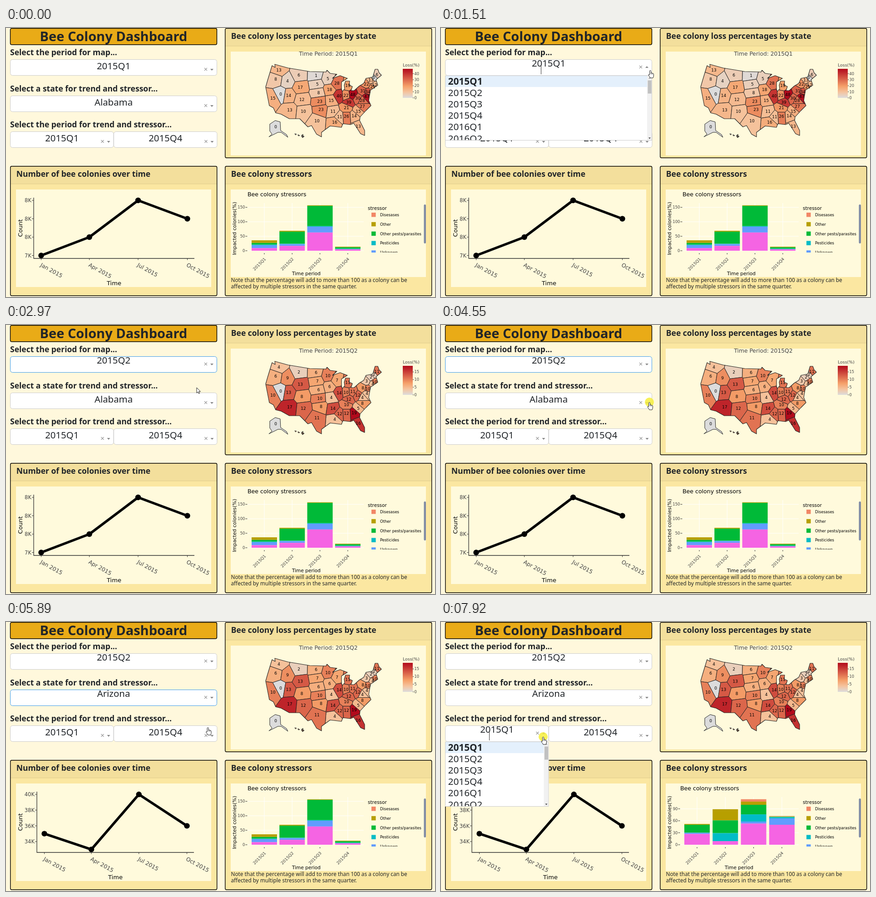
Animation of 945x593 px, one loop 7.99 s. Source, as an HTML page:

```html
<!DOCTYPE html>
<html lang="en">
<head>
<meta charset="utf-8">
<title>Bee Colony Dashboard</title>
<style>
  html, body { margin: 0; width: 100%; height: 100%; overflow: hidden; background: #fff8dc; }
  #stage { display: block; width: 100vw; height: 100vh; }
  text { font-family: "DejaVu Sans", sans-serif; fill: #444; }
  .ui { font: 20.4px "Noto Sans", sans-serif; fill: #212529; }
  .bold { font-weight: 700; }
  .title { font-size: 29px; }
  .head { font-size: 17.5px; }
  .row { font-size: 20.8px; }
  .note { font-size: 11.8px; }
  .mid { text-anchor: middle; }
  .end { text-anchor: end; }
  .ink { fill: #000; }
</style>
</head>
<body>
<svg id="stage" viewBox="0 0 945 593" preserveAspectRatio="none"></svg>
<script>
const LOOP = 7990;

const rect = (x, y, w, h, fill, more = '') =>
  `<rect x="${x}" y="${y}" width="${w}" height="${h}" fill="${fill}" ${more}/>`;
const text = (x, y, s, size, cls = '', more = '') =>
  `<text x="${x}" y="${y}" class="${cls}" ${size ? `font-size="${size}"` : ''} ${more}>${s}</text>`;
const path = (d, stroke, width = 1, fill = 'none') =>
  `<path d="${d}" stroke="${stroke}" stroke-width="${width}" fill="${fill}" stroke-linejoin="round"/>`;
const turned = (x, y, angle, s, size, cls) =>
  text(0, 0, s, size, cls, `transform="translate(${x} ${y}) rotate(${angle})"`);
const during = (from, to, content) => `<g data-from="${from}" data-to="${to}">${content}</g>`;
const times = (spans, content) => spans.map(([from, to]) => during(from, to, content)).join('');
const range = n => [...Array(n).keys()];

// Page furniture
const card = (x, y, title) =>
  rect(x, y, 455, 285.5, '#fbe7a1', 'rx="3"') +
  rect(x, y, 455, 39, '#f3df9c') + path(`M${x} ${y + 39}h455`, '#dfcc8c') +
  rect(x, y, 455, 285.5, 'none', 'rx="3" stroke="#000" stroke-width="1.4"') +
  text(x + 13, y + 23.5, title, 0, 'ui bold head');

const plotBox = (x, y, h) => rect(x, y, 430, h, '#fffadc');

function select(x, y, w, value, { raised = false, open = false, focus = false } = {}) {
  const high = raised || open, right = x + w, mid = y + (high ? 17 : 22);
  const arrow = open ? `M${right - 15} ${mid + 2}h7l-3.5 -4z` : `M${right - 15} ${mid - 1}h7l-3.5 4z`;
  return rect(x + .5, y + .5, w - 1, 35, '#fff', `rx="5" stroke="${focus ? '#3d9be9' : '#ccc'}"`) +
    text(x + w / 2, y + (high ? 16.3 : 21.7), value, 0, 'ui mid') +
    path(`M${right - 28} ${mid - 3}l6 6m0 -6l-6 6`, '#999', 1.1) + path(arrow, 'none', 0, '#888');
}

function dropdown(x, y, w, items, hovers) {
  const rowY = i => .5 + 25.1 * i, bar = w - 11;
  const rows = hovers.map(([from, to, i]) => during(from, to, rect(0, rowY(i), bar, 25.1, '#e4f0fc'))).join('') +
    items.map((s, i) => text(6.5, rowY(i) + 20, s, 0, i ? 'ui row' : 'ui row bold')).join('');
  return `<svg x="${x}" y="${y}" width="${w}" height="143.5">` +
    rect(0, 0, w, 143.5, '#fff') + rows +
    rect(bar, 0, 11, 143.5, '#f1f1f1') + rect(bar + 1.5, 11, 8, 29, '#c1c1c1') +
    path(`M${bar + 3} 7h5l-2.5 -3z`, 'none', 0, '#999') + path(`M${bar + 3} 137h5l-2.5 3z`, 'none', 0, '#444') +
    rect(.5, .5, w - 1, 142.5, 'none', 'stroke="#ccc"') + '</svg>';
}

const caret = (x, y, from) => during(from, from + 500, path(`M${x} ${y}v20`, '#333'));

// Map: one coastline, divided into the cells nearest to each state's label
const coast = 'M586 83L593 87L592 80L621 88L669 96L705 97L707 93L714 100L729 102L719 111L736 105L752 111' +
  'L739 119L739 135L741 140L746 134L745 126L748 117L757 117L756 126L763 129L760 138L767 138L778 128L788 122' +
  'L793 111L808 108L813 91L819 91L822 99L827 104L815 114L819 126L803 137L801 148L799 160L804 171L793 182' +
  'L780 196L779 204L790 226L790 237L781 233L774 222L766 210L759 213L742 211L739 219L714 216L695 230L695 240' +
  'L684 234L673 215L665 218L647 200L624 200L606 190L594 187L589 176L580 171L572 130L576 116Z';
const islands = 'M636 233l4 1l-2 2zM643 235l4 2l-3 1zM651 236l6 3l-4 3z';
const alaska = 'M581 212L593 204L604 207L605 226L618 235L621 241L606 230H599L579 240L586 234L581 227Z';

// Evenly spaced labels from (x0, y0) to (x1, y1), each with the losses of two quarters
const states = [];
function chain(x0, y0, x1, y1, losses) {
  const list = losses.split(' ');
  list.forEach((pair, i) => {
    const p = i / Math.max(1, list.length - 1);
    states.push({ x: x0 + (x1 - x0) * p, y: y0 + (y1 - y0) * p, loss: pair.split('/') });
  });
}
chain(601, 93, 594, 113, '13/4 8/6');
chain(588, 155, 605, 146, '15/10 0/0');
chain(620, 117, 625, 181, '4/9 14/13 13/17');
chain(645, 104, 655, 184, '6/2 17/13 12/8 10/12');
chain(683, 105, 694, 180, '1/6 5/7 8/6 23/10 23/8');
chain(709, 112, 724, 208, '5/10 18/6 15/4 11/14 16/4');
chain(729, 122, 753, 127, '28/7 19/11');
chain(734, 150, 764, 147, '40/14 22/10 48/11');
chain(755, 164, 750, 176, '39/12 21/10');
chain(735, 196, 750, 195, '11/12 26/12');
chain(767, 194, 785, 173, '14/19 15/5 27/8');
chain(775, 155, 785, 160, '30/12 28/4');
chain(786, 139, 794, 124, '31/8 22/3');
chain(804, 115, 817, 103, '13/2 0/2 6/11');
chain(812, 126, 808, 130, '12/10 21/4');
chain(797, 141, 795, 151, '34/10 47/4');
chain(685, 205, 685, 205, '10/11');
chain(776, 217, 776, 217, '13/16');

// Keeps the part of a polygon that lies nearer to a than to b
function nearer(polygon, a, b) {
  const side = ([x, y]) => (x - (a.x + b.x) / 2) * (b.x - a.x) + (y - (a.y + b.y) / 2) * (b.y - a.y);
  return polygon.flatMap((p, i) => {
    const q = polygon[(i + 1) % polygon.length], sp = side(p), sq = side(q), kept = sp <= 0 ? [p] : [];
    if (sp * sq < 0) kept.push(p.map((c, k) => c + (q[k] - c) * sp / (sp - sq)));
    return kept;
  });
}
for (const s of states) {
  const field = [[560, 70], [840, 70], [840, 250], [560, 250]];
  s.cell = 'M' + states.reduce((cell, other) => other === s ? cell : nearer(cell, s, other), field).join('L') + 'Z';
}

const scale = [[0, [220, 220, 220]], [.2, [245, 195, 157]], [.4, [245, 160, 105]], [1, [178, 10, 28]]];
const rgb = c => `rgb(${c.map(Math.round)})`;
function shade(v) {
  const i = Math.max(1, scale.findIndex(([stop]) => stop >= v));
  const [a, from] = scale[i - 1], [b, to] = scale[i], p = (v - a) / (b - a);
  return rgb(from.map((c, k) => c + (to[k] - c) * p));
}

function lossMap(quarter, max, step) {
  const ticks = range(Math.ceil(max / step)).map(i => {
    const y = 154 - 64 * i * step / max;
    return path(`M896 ${y}h2.5`, '#444') + text(899.5, y + 3, i * step, 8.3);
  });
  const label = (x, y, s) => text(x, y + 3.3, s, 9, 'mid ink');
  return text(710, 61, `Time Period: 2015Q${quarter + 1}`, 12.3, 'mid') +
    `<g clip-path="url(#land)">${states.map(s => path(s.cell, '#222', 1, shade(s.loss[quarter] / max))).join('')}</g>` +
    path(coast, '#222', 1.1) + path(alaska, '#222', 1, shade(0)) + path(islands, '#222', 1, shade(4 / max)) +
    states.map(s => label(s.x, s.y, s.loss[quarter])).join('') + label(594, 218, 0) + label(653, 238, 4) +
    text(874, 85, 'Loss(%)', 9.4) + rect(874, 90, 22, 64, 'url(#loss)') + ticks.join('');
}

// Charts
const months = { Jan: 0, Apr: 90, Jul: 181, Oct: 273 };

function lineChart(left, right, ticks, base, unit, values) {
  const first = left + 16.5, last = right - 15.5;
  const points = Object.values(months).map((day, i) => [first + (last - first) * day / 273, base - unit * values[i]]);
  return path(`M${left} 374V508H${right}`, '#333', 1.3) +
    ticks.map((s, i) => {
      const y = 380 + i * (base - 380) / (ticks.length - 1);
      return path(`M${left - 4} ${y}h4`, '#333') + text(left - 5, y + 4.3, s, 11.6, 'end');
    }).join('') +
    Object.keys(months).map((m, i) => path(`M${points[i][0]} 508v3.5`, '#333') +
      turned(points[i][0] - 3, 525, 29, m + ' 2015', 12.2)).join('') +
    path('M' + points.join('L'), '#000', 5.6) +
    points.map(([x, y]) => `<circle cx="${x}" cy="${y}" r="6.2"/>`).join('') +
    turned(36, 441, -90, 'Count', 13.1, 'mid ink') + text((left + right) / 2, 567, 'Time', 13, 'mid ink');
}

const stressors = ['Disesases', 'Other', 'Other pests/parasites', 'Pesticides', 'Unknown'];
const colors = ['#f28766', '#b79f00', '#00ba38', '#00bcc6', '#619cff', '#f564e3'];

// Each bar lists its share per stressor, from the top layer down.
function barChart(left, step, unit, tick, bars) {
  const centers = bars.map((_, i) => left + 37 + i * step);
  const stack = (shares, x) => {
    let y = 491 - unit * shares.reduce((a, b) => a + b);
    return shares.map((share, k) => rect(x - 28, (y += unit * share) - unit * share, 56, unit * share, colors[k])).join('');
  };
  return text(left, 371, 'Bee colony stressors', 12.55, 'ink') +
    range(4).map(i => {
      const y = 491 - unit * tick * i;
      return path(`M${left} ${y}H788`, '#fff') + path(`M${left - 4.5} ${y}h4`, '#333') +
        text(left - 5.5, y + 3, i * tick, 8.5, 'end');
    }).join('') +
    centers.map((x, i) => path(`M${x} 386V496`, '#fff') + path(`M${x} 496v3`, '#333') +
      turned(x + 4, 510, -45, '2015Q' + (i + 1), 9, 'end') + stack(bars[i], x)).join('') +
    text(left + 129.5, 545, 'Time period', 10.6, 'mid ink');
}

const legend = text(797, 401, 'stressor', 10.5, 'ink') +
  '<svg x="797" y="404" width="123" height="91">' +
  stressors.map((s, i) => rect(8, 3 + 20.8 * i, 9.5, 9.5, colors[i]) + text(27, 11 + 20.8 * i, s, 8.45, 'ink')).join('') +
  '</svg>' + rect(920.5, 389, 4.5, 86, '#808ba4', 'rx="2.2"');

const quarters = range(6).map(i => `${2015 + (i >> 2)}Q${i % 4 + 1}`);
const names = ['Alabama', 'Arizona', 'Arkansas', 'California', 'Colorado', 'Connecticut'];
const prompts = ['Select the period for map...', 'Select a state for trend and stressor...',
  'Select the period for trend and stressor...'];

// Pointer
const ring = '<circle r="10" fill="#f6ee3c" fill-opacity=".85"/>';
const hand = path('M-1.5 1.5Q0 -1 1.5 1.5V6Q3.5 4.8 4.2 6.8Q7 6.3 7.4 9V12Q7.4 14 6 17H0Q-1 14.5 -4 11Q-4.3 8.5 -1.5 10Z', '#222', 1, '#fff') +
  path('M1.5 6v3M4.2 7v2.5', '#222', .9);
const arrow = path('M0 0V12L2.8 9.5L4.7 13.4L6.5 12.6L4.7 8.8H8.4Z', '#222', 1, '#fff');
const clicks = [[1440, 1510], [2570, 2700], [4550, 4680], [5490, 5630], [7920, LOOP]];
const handTimes = [[1170, 2040], [4080, 5030], [5890, LOOP]];
const arrowTimes = [[540, 1170], [2040, 4080], [5030, 5890]];

const stage = document.getElementById('stage');
stage.innerHTML =
  `<defs><clipPath id="land"><path d="${coast}"/></clipPath><linearGradient id="loss" x1="0" y1="1" x2="0" y2="0">` +
  scale.map(([stop, c]) => `<stop offset="${stop}" stop-color="${rgb(c)}"/>`).join('') + '</linearGradient></defs>' +
  rect(9.5, .8, 455, 36, '#e9ab17', 'rx="3" stroke="#000" stroke-width="1.4"') +
  text(237, 29, 'Bee Colony Dashboard', 0, 'ui bold title mid') +
  prompts.map((s, i) => text(9, 60 + 79.6 * i, s, 0, 'ui bold head')).join('') +
  card(482.8, .8, 'Bee colony loss percentages by state') + plotBox(495, 52, 229) +
  card(9.7, 304.8, 'Number of bee colonies over time') + plotBox(22, 356, 215) +
  card(482.8, 304.8, 'Bee colony stressors') + plotBox(495, 356, 193) +
  during(0, 2970, lossMap(0, 48, 10)) + during(2970, LOOP, lossMap(1, 19, 5)) +
  during(0, 5830, lineChart(61, 415, ['8K', '8K', '8K', '7K'], 501.5, 40.5, [0, 1, 3, 2])) +
  during(5830, LOOP, lineChart(68, 414, ['40K', '38K', '36K', '34K'], 484, 17.33, [1, -1, 6, 2])) +
  during(0, 6220, barChart(532, 61.3, .638, 50,
    [[0, 9, 6, 2, 10, 9], [0, 3, 42, 1, 6, 17], [0, 2, 70, 2, 20, 63], [0, 2, 5, 2, 0, 5]])) +
  during(6220, LOOP, barChart(527, 62.3, .88, 30,
    [[0, 2, 20, 0, 3, 27], [0, 28, 32, 20, 0, 9], [6, 8, 24, 18, 5, 53], [1, 1, 1, 3, 16, 50]])) +
  turned(506.5, 442, -90, 'Impacted colonies(%)', 10.8, 'mid ink') + legend +
  text(495.5, 560, 'Note that the percentage will add to more than 100 as a colony can be', 0, 'ui note') +
  text(495.5, 574, 'affected by multiple stressors in the same quarter.', 0, 'ui note') +
  during(0, 1510, select(9, 69, 456, '2015Q1')) +
  during(1510, 2640, select(9, 69, 456, '2015Q1', { open: true })) +
  during(2640, 4610, select(9, 69, 456, '2015Q2', { raised: true, focus: true })) +
  during(4610, LOOP, select(9, 69, 456, '2015Q2', { raised: true })) +
  during(0, 4610, select(9, 149, 456, 'Alabama')) +
  during(4610, 5560, select(9, 149, 456, 'Alabama', { open: true })) +
  during(5560, 7920, select(9, 149, 456, 'Arizona', { raised: true, focus: true })) +
  during(7920, LOOP, select(9, 149, 456, 'Arizona', { raised: true })) +
  during(0, 7920, select(9, 228, 228.5, '2015Q1')) +
  during(7920, LOOP, select(9, 228, 228.5, '2015Q1', { open: true })) +
  select(237, 228, 228.5, '2015Q4') +
  caret(220.5, 82, 1510) + caret(106.5, 241, 7920) +
  during(1510, 2640, dropdown(9, 104.5, 456, quarters, [[1510, 2040, 0], [2040, 2640, 1]])) +
  during(4610, 5560, dropdown(9, 184, 456, names, [[4610, 5030, 0], [5030, 5560, 1]])) +
  during(7920, LOOP, dropdown(9, 263.5, 228.5, quarters, [[7920, LOOP, 0]])) +
  `<g id="pointer">${times(clicks, ring)}${times(handTimes, hand)}${times(arrowTimes, arrow)}</g>`;

// Pointer path: start, end, number of jumps, destination
const moves = [
  [540, 1240, 11, 461, 93], [1970, 2180, 4, 420, 138], [3830, 4150, 6, 459, 170],
  [4960, 5170, 4, 416, 222], [5720, 5960, 4, 450, 234], [6950, 7730, 11, 214, 252], [7770, 7770, 1, 225, 253]
];
function pointerAt(t) {
  let x = 915, y = 575;
  for (const [from, to, count, toX, toY] of moves) {
    if (t < from) break;
    const jump = Math.floor((t - from) / ((to - from) / (count - 1) || 1)) + 1;
    const p = Math.min(1, jump / count), eased = p * p * (3 - 2 * p);
    x += (toX - x) * eased;
    y += (toY - y) * eased;
  }
  return [x, y];
}

const timed = [...stage.querySelectorAll('[data-from]')].map(el => [el, +el.dataset.from, +el.dataset.to]);
const pointer = document.getElementById('pointer');
function render() {
  const t = performance.now() % LOOP;
  for (const [el, from, to] of timed) el.style.display = t >= from && t < to ? '' : 'none';
  pointer.setAttribute('transform', `translate(${pointerAt(t)})`);
  requestAnimationFrame(render);
}
render();
</script>
</body>
</html>
```
